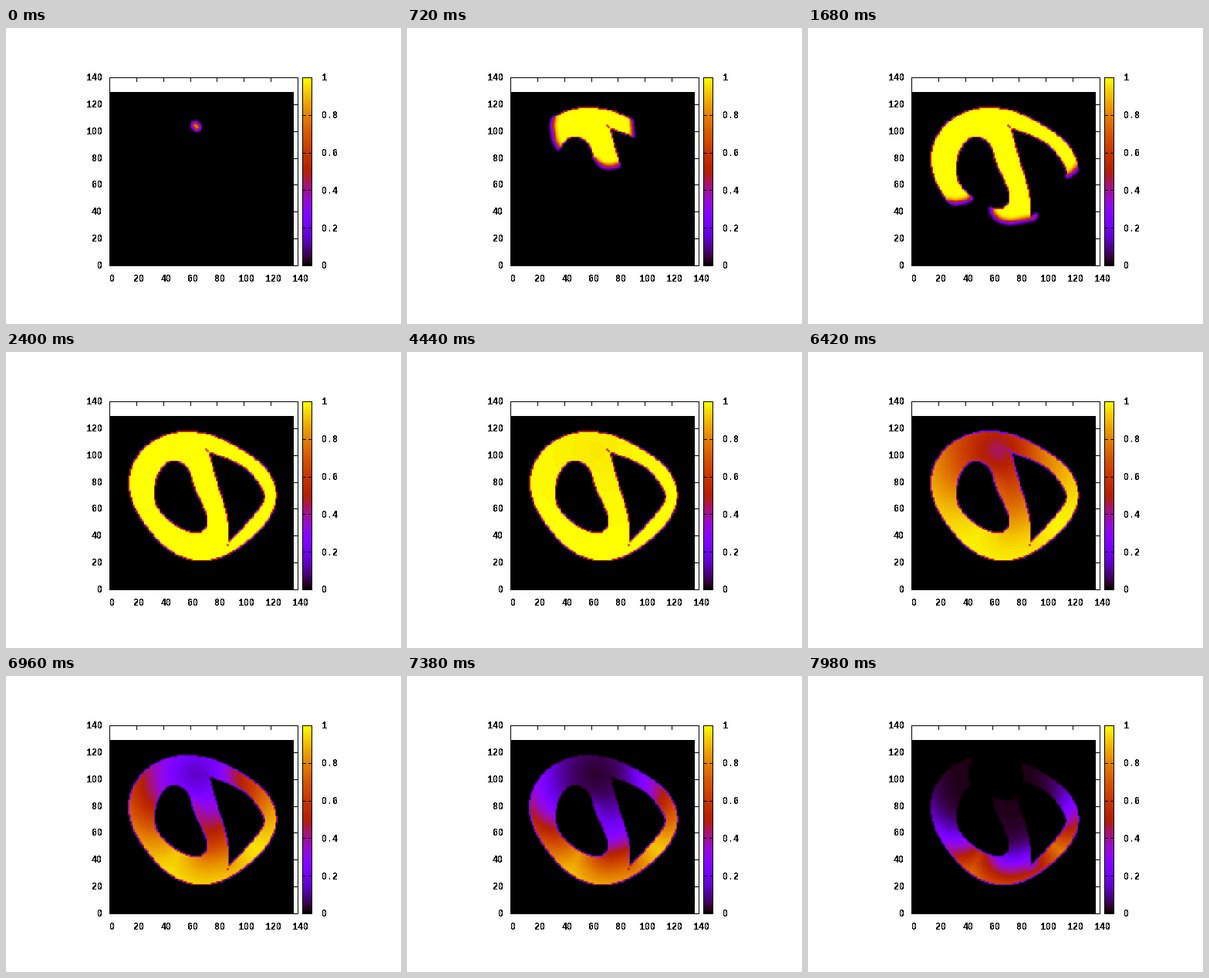
Recreate the animation shown at these times as a matplotlib script. Size 512 by 384 pixels, loop 8000 ms.

```python
from math import gcd, hypot

import matplotlib.pyplot as plt
import numpy as np
from matplotlib.animation import FuncAnimation
from matplotlib.colors import ListedColormap
from matplotlib.path import Path

W, H, DPI = 512, 384, 64
PX = 72 / DPI                       # one pixel in points
LEFT, RIGHT, TOP, BOTTOM = 134, 378, 64, 308
BAR_LEFT, BAR_RIGHT = 384, 396
UNIT = (RIGHT - LEFT) / 140         # pixels per data unit
NX, NY = 137, 129
LOOP, TICK, STEP = 8000, 20, 60

# Key points of the two cavities; a doubled point makes a sharp corner.
CHAMBER = [(219, 141), (236, 152), (245, 178), (261, 217), (250, 234),
           (222, 226), (196, 201), (194, 168), (205, 147)]
SIDE = [(263, 130), (263, 130), (306, 148), (331, 177), (330, 200),
        (289, 247), (289, 247), (286, 211), (274, 170)]

gx, gy = np.meshgrid(LEFT + UNIT * np.arange(NX + 1),
                     BOTTOM - UNIT * np.arange(NY + 1))


def smooth_loop(points, n=12):
    """Closed Catmull-Rom curve through the points."""
    p = np.array(points, float)
    a, b, c, d = (np.roll(p, k, axis=0)[:, None] for k in (1, 0, -1, -2))
    s = np.linspace(0, 1, n, endpoint=False)[None, :, None]
    curve = (2 * b + (c - a) * s + (2 * a - 5 * b + 4 * c - d) * s**2
             + (3 * b - a - 3 * c + d) * s**3) / 2
    return curve.reshape(-1, 2)


def wall():
    """Ellipse bulging to the upper left, flattened on the other diagonals."""
    turn = np.linspace(0, 2 * np.pi, 240, endpoint=False)
    r = (0.993 - 0.015 * np.cos(4 * turn)
         + 0.05 * sum(np.cos(k * turn) for k in (1, 2, 3)))
    angle = turn - 0.75 * np.pi
    return np.column_stack([256 + 93.5 * r * np.cos(angle),
                            188 + 82 * r * np.sin(angle)])


def inside(curve):
    grid = np.column_stack([gx.ravel(), gy.ravel()])
    return Path(curve).contains_points(grid).reshape(gx.shape)


def bump(cx, cy, rx, ry):
    return np.exp(-((gx - cx) / rx) ** 2 - ((gy - cy) / ry) ** 2)


def logistic(z):
    return 1 / (1 + np.exp(-np.clip(z, -50, 50)))


def travel_distance(tissue, slowness):
    """Shortest path length from the pacing site through the tissue."""
    pad = 3
    dist = np.full((NY + 1 + 2 * pad, NX + 1 + 2 * pad), 1e6)
    core = dist[pad:-pad, pad:-pad]
    core[104, 64] = core[103, 65] = 0
    span = range(-pad, pad + 1)
    moves = [(i, j) for i in span for j in span if gcd(i, j) == 1]
    for _ in range(150):
        before = core.copy()
        for i, j in moves:
            near = dist[pad + j:pad + j + NY + 1, pad + i:pad + i + NX + 1]
            reach = near + UNIT * hypot(i, j) * slowness
            core[tissue] = np.minimum(core, reach)[tissue]
        if np.array_equal(before, core):
            break
    return core.copy()


tissue = (inside(wall()) & ~inside(smooth_loop(CHAMBER))
          & ~inside(smooth_loop(SIDE)))
slowness = 1 + 0.5 * bump(285, 126, 20, 18) + 0.9 * bump(241, 163, 12, 14)
dist = travel_distance(tissue, slowness)
dist[~tissue] = 300

recover_at = 6500 + 6 * dist + 0.045 * dist**2 - 120 * bump(265, 215, 25, 30)
recover_span = 600 - 0.45 * dist


def potential(t):
    front = 3.4 + 0.0745 * t
    blur = 1.4 + 0.5 * min(t / 700, 1)
    rise = np.clip((logistic((front - dist) / blur) - 0.04) / 0.95, 0, 1)
    # Slow onset, steep drop, then a faint tail.
    late = (t - recover_at) / recover_span
    fall = 0.9 * np.exp(-np.exp(late)) + 0.1 * logistic(-late)
    fall = np.where(fall < 0.012, 0, fall)
    v = np.where(tissue, rise * fall, 0)
    cells = (v[1:, 1:] + v[1:, :-1] + v[:-1, 1:] + v[:-1, :-1]) / 4
    return np.round(cells * 127) / 127


level = np.linspace(0, 1, 128)
heat = ListedColormap(np.column_stack(
    [np.sqrt(level), level**3, np.clip(np.sin(2 * np.pi * level), 0, 1)]))

fig = plt.figure(figsize=(W / DPI, H / DPI), dpi=DPI, facecolor="white")
ax = fig.add_axes([0, 0, 1, 1])
ax.axis("off")

style = dict(cmap=heat, vmin=0, vmax=1, origin="lower", aspect="auto",
             interpolation="nearest")
field = ax.imshow(potential(0), extent=(LEFT, LEFT + NX * UNIT, BOTTOM,
                                        BOTTOM - NY * UNIT), **style)
ax.imshow(level[:, None], extent=(BAR_LEFT, BAR_RIGHT, BOTTOM, TOP), **style)
ax.set_xlim(0, W)
ax.set_ylim(H, 0)


def line(xs, ys):
    # Whole coordinates snap to the middle of their pixel.
    ax.plot(np.round(xs), np.round(ys), color="black", lw=PX,
            antialiased=False, snap=True, solid_capstyle="projecting")


def label(x, y, text, align):
    ax.text(x, y + 4, text, ha=align, va="baseline", color="black",
            family="Liberation Mono", weight="bold", size=11.67 * PX,
            antialiased=False)


def box(x0, x1):
    line([x0, x1, x1, x0, x0], [TOP, TOP, BOTTOM, BOTTOM, TOP])


box(LEFT, RIGHT)
box(BAR_LEFT, BAR_RIGHT)
for value in range(0, 141, 20):
    x, y = LEFT + value * UNIT, BOTTOM - value * UNIT
    line([x, x], [TOP, TOP + 5])
    line([RIGHT - 5, RIGHT], [y, y])
    label(x + 3.5, 325, str(value), "center")
    label(125, y, str(value), "right")
for k in range(6):
    y = BOTTOM - k * (BOTTOM - TOP) / 5
    line([BAR_LEFT, BAR_LEFT + 4], [y, y])
    line([BAR_RIGHT - 4, BAR_RIGHT], [y, y])
    label(409, y + 0.5, f"{k / 5:g}", "left")


def update(frame):
    field.set_data(potential(frame * TICK // STEP * STEP))
    return [field]


anim = FuncAnimation(fig, update, frames=LOOP // TICK, interval=TICK,
                     repeat=True, repeat_delay=0, blit=False)
plt.show()
```
